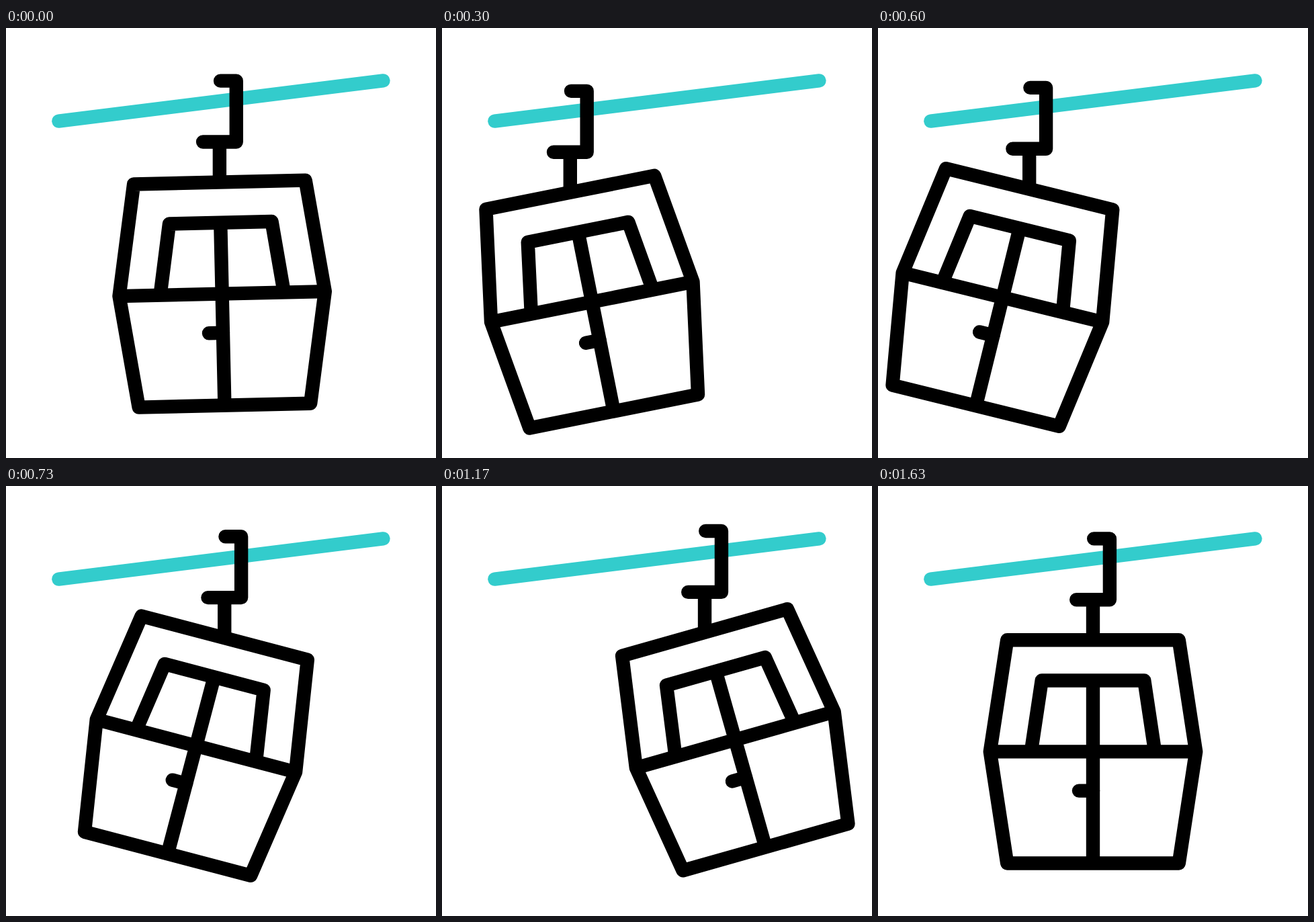
Write an HTML page that moves like this. It is 640 px wide and 640 px high and loops after 1.67 s.

```html
<!DOCTYPE html>
<html lang="en">
<head>
<meta charset="utf-8">
<title>Cable car</title>
<style>
  html, body { margin: 0; width: 100%; height: 100%; overflow: hidden; background: #fff; }
  svg { display: block; width: 100%; height: 100%; }
  path { fill: none; stroke: #000; stroke-width: 20.4; stroke-linejoin: round; }
  .round { stroke-linecap: round; }
  .cable { stroke: #3cc; }
</style>
</head>
<body>
<svg viewBox="0 0 640 640">
  <path class="cable round" d="M78.4 138.6 561.4 78.4"/>
  <g id="car">
    <path class="round" d="M321.2 78.4H344.9V169.3H295.2"/>
    <path d="M320 169.3V229.3"/>
    <g id="cabin">
      <path d="M192.2 229.3H447.8L473.2 395.4 447.8 561.5H192.2L166.8 395.4Z"/>
      <path d="M166.8 395.4H473.2M320 289.5V561.5"/>
      <path d="M227.8 395.4 243.7 289.5H396.3L412.2 395.4"/>
      <path class="round" d="M299 453.6H320"/>
    </g>
  </g>
</svg>
<script>
  const LOOP = 1670, FPS = 30, FRAMES = 50;
  const RISE = 5.1, HOLD = 2.5;

  // Three rides along the cable, times in frames. On each the cabin
  // tilts on departure, holds, then swings back level.
  const rides = [
    { start: 0.1, arrive: 12.7, level: 14.2, dx: -146.5, dy: 17.5, tilt: -15.8 },
    { start: 14.8, arrive: 29.2, level: 29.15, dx: 251.4, dy: -34.3, tilt: 15.1 },
    { start: 29.15, arrive: 47.2, level: 49.2, dx: -104.9, dy: 16.8, tilt: -15.8 }
  ];

  const car = document.getElementById('car');
  const cabin = document.getElementById('cabin');

  function ramp(frame, from, to) {
    const u = Math.min(1, Math.max(0, (frame - from) / (to - from)));
    return u * u * (3 - 2 * u);
  }

  function pose(frame) {
    let x = 0, y = 0, angle = 0;
    for (const { start, arrive, level, dx, dy, tilt } of rides) {
      const moved = ramp(frame, start, arrive);
      const tilted = start + RISE;
      x += dx * moved;
      y += dy * moved;
      angle += tilt * (ramp(frame, start, tilted) - ramp(frame, tilted + HOLD, level));
    }
    return { x, y, angle };
  }

  function draw(now) {
    const step = Math.floor((now % LOOP) * FPS / 1000 + 0.25);
    const { x, y, angle } = pose(Math.min(step + 1, FRAMES));
    car.setAttribute('transform', `translate(${x} ${y})`);
    cabin.setAttribute('transform', `rotate(${angle} 320 229.3)`);
  }

  const origin = performance.now();
  function tick() {
    draw(performance.now() - origin);
    requestAnimationFrame(tick);
  }
  tick();
</script>
</body>
</html>
```
